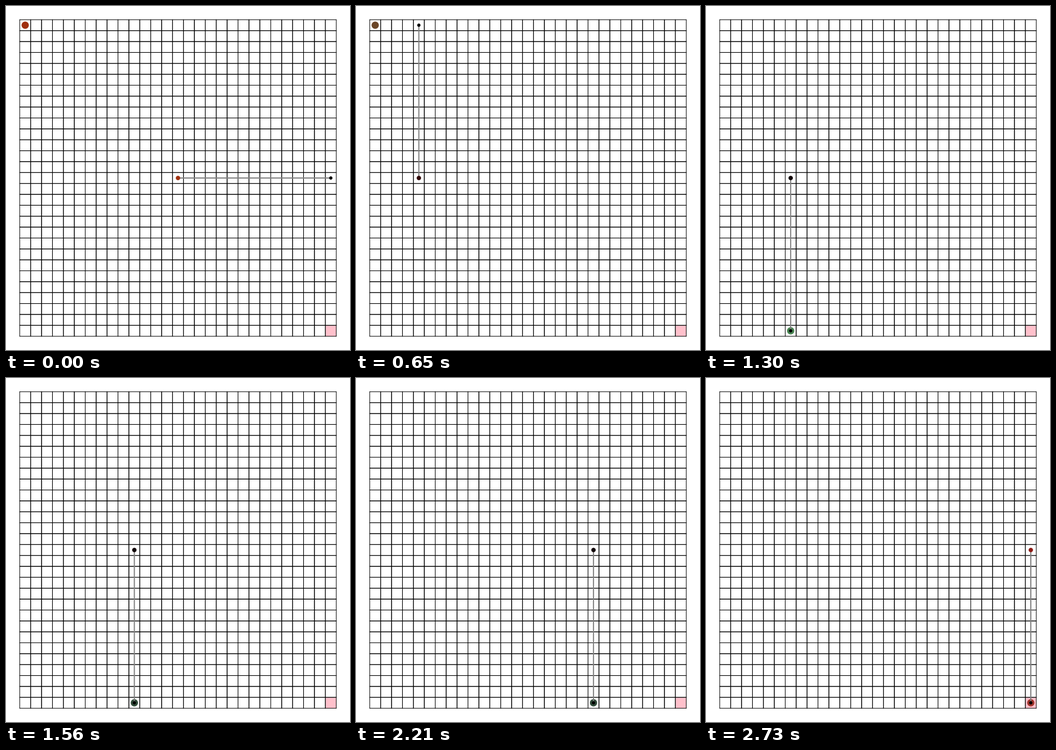
These frames come from a looping animation (610x610 px, 5.73 s). A matplotlib script:

```python
import matplotlib.pyplot as plt
from matplotlib.animation import FuncAnimation
from matplotlib.collections import LineCollection
from matplotlib.patches import Circle, Rectangle

SIZE, DPI = 610, 80
N = 29
CELL = 600 / (N + 2)
LEFT = 5 + CELL
RIGHT = LEFT + N * CELL
REACH = N // 2
TICK, STEP, LOOP = 10, 130, 5730
LAST = 21
GRAB = 7

# first step of each phase, item colour, joint colour
PHASES = [
    (0, "#a03010", "#a03010"),
    (1, "#6a4628", "#300808"),
    (7, "#305c38", "#7c0408"),
    (8, "#468350", "#100205"),
    (11, "#304c3a", "#100205"),
    (21, "#a0342c", "#8c1a14"),
]


def px(width):
    return width * 72 / DPI


def center(i):
    return LEFT + (i + 0.5) * CELL


def pose(step):
    """Joint column, hand column and hand row at a step."""
    col = 2 * abs(step - GRAB)
    if step == 0:
        return col, col + REACH, REACH
    return col, col, 0 if step <= GRAB else N - 1


fig = plt.figure(figsize=(SIZE / DPI, SIZE / DPI), dpi=DPI, facecolor="white")
ax = fig.add_axes([0, 0, 1, 1])
ax.set_xlim(0, SIZE)
ax.set_ylim(SIZE, 0)
ax.axis("off")

ax.add_patch(Rectangle((RIGHT - CELL, RIGHT - CELL), CELL, CELL,
                       fc="pink", ec="none", zorder=1))

# shared cell edges are stroked once per neighbouring cell
lines = []
for k in range(N + 1):
    p = LEFT + k * CELL
    pair = [[(LEFT - 0.5, p), (RIGHT + 0.5, p)],
            [(p, LEFT - 0.5), (p, RIGHT + 0.5)]]
    lines += pair * (2 if 0 < k < N else 1)
grid = LineCollection(lines, colors="black", linewidths=px(1),
                      capstyle="butt", zorder=2)
grid.set_snap(False)
ax.add_collection(grid)


def dot(radius, color, z):
    return ax.add_patch(Circle((0, 0), radius, fc=color, ec="none", zorder=z))


item = dot(CELL / 3, "brown", 3)
arm, = ax.plot([], [], color="gray", lw=px(2), solid_capstyle="butt",
               snap=False, zorder=4)
joint = dot(CELL / 5, "maroon", 5)
hand = dot(CELL * 0.15, "black", 6)


def update(i):
    step = min(i * TICK // STEP, LAST)
    col, hc, hr = pose(step)
    jx, jy = center(col), center(REACH)
    hx, hy = center(hc), center(hr)
    arm.set_data([jx, hx], [jy, hy])
    joint.center = jx, jy
    hand.center = hx, hy
    item.center = (hx, hy) if step >= GRAB else (center(0), center(0))
    _, item_color, joint_color = [p for p in PHASES if p[0] <= step][-1]
    item.set_facecolor(item_color)
    joint.set_facecolor(joint_color)
    return item, arm, joint, hand


anim = FuncAnimation(fig, update, frames=LOOP // TICK, interval=TICK,
                     init_func=lambda: update(0), repeat=True)
plt.show()
```
